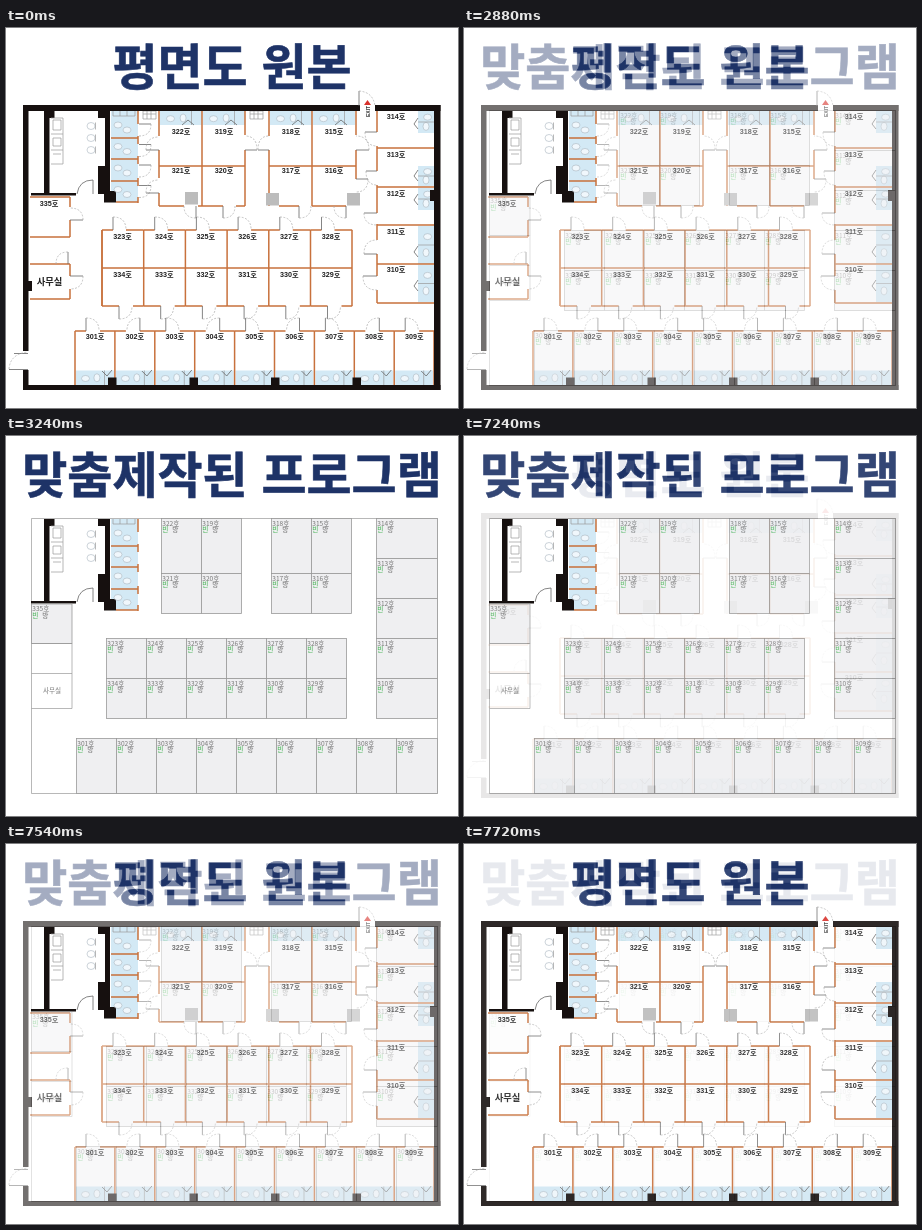
Recreate the animation shown at these times as an HTML page. Size 452x380 px, loop 7.78 s.

```html
<!DOCTYPE html>
<html lang="ko">
<head>
<meta charset="utf-8">
<style>
  html, body { margin: 0; width: 100%; height: 100%; overflow: hidden; background: #fff; }
  svg { display: block; width: 452px; height: 380px; }
  text { font-family: "Noto Sans CJK KR", "Noto Sans CJK", sans-serif; }
  .title { font-size: 49px; font-weight: 700; fill: #1e3367; stroke: #1e3367; stroke-width: .6; text-anchor: middle; }
  .name { font-family: "Liberation Sans", "Noto Sans CJK KR", sans-serif; font-size: 7.2px; font-weight: 700; fill: #222; text-anchor: middle; }
  .tag { font-size: 6.6px; fill: #777; }
  .wall { fill: none; stroke: #c8713c; stroke-width: 1.5; }
  .thin { fill: none; stroke: #9a9a9a; stroke-width: .7; }
  .leaf { fill: none; stroke: #666; stroke-width: .8; }
  .swing { fill: none; stroke: #aaa; stroke-width: .7; stroke-dasharray: 2 1.5; }
  .fixture { fill: #fff; fill-opacity: .65; stroke: #a9b6bf; stroke-width: .6; }
  .cell { fill: #efeff1; stroke: #9a9a9a; stroke-width: .8; }
</style>
</head>
<body>
<svg viewBox="0 0 452 380">
  <rect width="452" height="380" fill="#fff"/>
  <g id="drawing"></g>
  <g id="program"></g>
</svg>
<script>
const range = (n, f) => Array.from({ length: n }, (_, i) => f(i)).join('');
const rect = (x, y, w, h, fill) => `<rect x="${x}" y="${y}" width="${w}" height="${h}" fill="${fill}"/>`;
const path = (cls, d) => `<path class="${cls}" d="${d}"/>`;
const text = (cls, x, y, s) => `<text class="${cls}" x="${x}" y="${y}">${s}</text>`;
const black = (x, y, w, h) => rect(x, y, w, h, '#16100f');
const oval = (x, y, rx, ry) => `<ellipse class="fixture" cx="${x}" cy="${y}" rx="${rx}" ry="${ry}"/>`;
const name = (x, y, n) => text('name', x, y, n + '호');

// Doors: a straight leaf from the hinge, then the swing back to the wall.
const door = (x, y, w, h) => path('leaf', `M${x} ${y}v${h}`) + path('swing', `M${x} ${y + h}q${w} 0 ${w} ${-h}`);
const sideDoor = (x, y, w, h) => path('leaf', `M${x} ${y}h${w}`) + path('swing', `M${x + w} ${y}q0 ${h} ${-w} ${h}`);

function bath(x, y, w, h) {
  const wide = w > h;
  return rect(x, y, w, h, '#d3e9f5') +
    (wide
      ? oval(x + w * .25, y + h * .55, 4, 3) + oval(x + w * .55, y + h * .5, 3, 4)
      : oval(x + w * .6, y + h * .28, 4, 3) + oval(x + w * .5, y + h * .7, 3, 4)) +
    path('thin', wide ? `M${x + w * .75} ${y}v${h}` : `M${x} ${y + h * .5}h${w}`);
}

// Kitchen and wash cubicles, shared by both plans.
function services() {
  return black(38, 83, 5.5, 83) + black(43, 83, 5.5, 7) + black(25, 165, 45, 2.5) +
    black(99, 83, 5, 82) + black(92, 83, 8, 7) + black(92, 138, 12, 28) +
    path('thin', 'M45 90h12v46h-12M47 92h8v10h-8zM45 106h12M47 110h8v8h-8zM45 122h12M47 126h8') +
    range(3, i => oval(85, 98 + i * 12, 4, 3.5) + path('thin', `M89.5 ${94.5 + i * 12}v7`)) +
    path('leaf', 'M87 166v-14q-14 0 -16 14') +
    rect(105, 83, 27, 91, '#d3e9f5') + black(98, 163, 12, 11.5) +
    range(4, i => oval(112, 97 + i * 21.5, 4, 3) + oval(121, 102 + i * 21.5, 4, 3)) +
    path('thin', 'M107 83v5h22v-5M114 83v5M121 83v5') +
    path('wall', 'M105 110h27M105 131h27M105 153h27M110 174h22M132 83v13M132 108v8M132 128v8M132 150v8M132 169v6');
}

const middleNames = [i => 323 + i, i => 334 - i];
const blockNames = [[322, 319, 318, 315], [321, 320, 317, 316]];

function drawingPlan() {
  const outer = black(17, 77, 337, 6) + black(369, 77, 65.5, 6) + black(17, 77, 5.5, 246) +
    black(17, 342, 5.5, 20) + black(428, 77, 6.5, 285) + black(17, 357, 417.5, 5) +
    black(22, 253, 4, 10) + black(424, 162, 5, 11) +
    range(4, i => black(102 + i * 81.5, 349.5, 8.5, 8));

  const upper = [153, 196, 263, 306].map((x, i) =>
    bath(x + 1, 83, 42, 14) +
    path('leaf', `M${x + 23} 97l6 -5 6 5`) +
    name(x + 22, 105.7, blockNames[0][i]) + name(x + 22, 144.7, blockNames[1][i])).join('') +
    path('wall', 'M153 83v25M153 122v28M153 165v13M196 83v95M239 83v24M239 122v56' +
      'M153 138h86M153 178h25M192 178h25M230 178h9' +
      'M263 83v25M263 122v56M306 83v95M350 83v24M350 122v29M263 138h87M273 178h20M306 178h34') +
    [[179, 164], [260, 165], [341, 165]].map(([x, y]) => rect(x, y, 13, 12.5, '#bcbcbc')).join('') +
    [137, 244].map(x => path('thin', `M${x} 83h13v8h-13zM${x} 86h13M${x + 4} 83v8M${x + 8} 83v8`)).join('') +
    range(4, i => sideDoor(133, 96 + i * 20.5, 12, 12)) +
    sideDoor(153, 122, -13, -13) + sideDoor(153, 165, -13, -13) + sideDoor(239, 122, 12, -14) +
    sideDoor(263, 122, -11, -14) + sideDoor(350, 122, 13, -14) + sideDoor(350, 151, 12, 13) +
    door(217, 178, 12, 12) + door(293, 178, 12, 12) + door(190, 178, -12, 12) + door(340, 178, -12, 12);

  const right = range(5, i => name(390, 90.7 + i * 38.4, 314 - i)) +
    bath(412, 83, 16, 22) + bath(412, 138, 16, 20) + bath(412, 160, 16, 22) +
    bath(412, 198, 16, 38) + bath(412, 237, 16, 37) +
    path('wall', 'M371 83v21M371 118v25M371 157v28M371 196v16M371 226v22M371 262v13' +
      'M371 120h57M371 159h57M371 197h57M371 236h57M371 275h57') +
    sideDoor(371, 104, -12, 14) + sideDoor(371, 143, -11, 14) + sideDoor(371, 185, -13, 12) +
    sideDoor(371, 226, -13, -14) + sideDoor(371, 248, -14, 14) +
    [96, 148, 172, 224, 258].map(y => path('leaf', `M412 ${y - 6}l-4 6 4 5`)).join('');

  const middle = path('wall', 'M96 202v76M96 240h250M346 202v76') +
    range(6, i => {
      const x = 96 + i * 41.7;
      return path('wall', `M${x} 202v76M${x} 202h11M${x + 24} 202h17.7M${x} 278h17M${x + 31} 278h10.7`) +
        door(x + 11, 202, 13, -13) + door(x + 17, 278, 13, 13) +
        name(x + 20.5, 210.5, middleNames[0](i)) + name(x + 20.5, 248.5, middleNames[1](i));
    });

  const lower = range(9, i => {
    const x = 69 + i * 39.9;
    return bath(x + 1, 342.5, 38, 14.5) +
      path('leaf', `M${x + 27} 343l5 5 5 -6`) +
      path('wall', `M${x} 303v54M${x} 303h11M${x + 25} 303h15`) +
      door(x + (i % 2 ? 25 : 11), 303, i % 2 ? -13 : 13, -13) + name(x + 20, 311.2, 301 + i);
  }) + path('wall', 'M428 303v54');

  const left = path('wall', 'M24 169h40M24 209h40M24 236h40M24 271h40M64 169v10M64 192v17M64 236v12M64 261v10') +
    sideDoor(64, 192, 13, -12) + sideDoor(64, 248, 13, 13) + door(62, 236, -12, -12) +
    name(43, 177.7, 335) + '<text class="name" x="43.5" y="257" style="font-size:9.3px">사무실</text>';

  const entrances = path('leaf', 'M3 341.5h19M8 325.5h14M353 78v-15') +
    path('swing', 'M3 341q1 -15 19 -17M353 63q14 1 16 15') +
    '<path d="M358 77l3.5 -5 3.5 5z" fill="#d8322c"/>' +
    '<text transform="translate(364 89) rotate(-90)" style="font:700 5px \'Liberation Sans\',sans-serif" fill="#333">EXIT</text>';

  return text('title', 226, 57, '평면도 원본') + services() + upper + right + middle + lower + left + outer + entrances;
}

function cell(x, y, w, h, number) {
  return `<rect class="cell" x="${x}" y="${y}" width="${w}" height="${h}"/>` +
    text('tag', x + .8, y + 7, number + '호') +
    `<text class="tag" x="${x + .8}" y="${y + 13.8}"><tspan fill="#35ad45">빈</tspan> <tspan dx="2" fill="#666">방</tspan></text>`;
}

function programPlan() {
  const upper = [155.5, 195.5, 265.5, 305.5].map((x, i) =>
    cell(x, 82.5, 40, 55, blockNames[0][i]) + cell(x, 137.5, 40, 40, blockNames[1][i])).join('');
  return '<rect width="452" height="380" fill="#fff"/>' +
    text('title', 226, 57, '맞춤제작된 프로그램') +
    path('thin', 'M25.5 82.5h406v275h-406z') + services() + upper +
    range(5, i => cell(370.5, 82.5 + i * 40, 61, 40, 314 - i)) +
    range(6, i => cell(100.5 + i * 40, 202.5, 40, 40, middleNames[0](i)) +
      cell(100.5 + i * 40, 242.5, 40, 40, middleNames[1](i))) +
    range(9, i => cell(70.5 + i * 40, 302.5, i < 8 ? 40 : 41, 55, 301 + i)) +
    cell(25.5, 168, 40.5, 39.5, 335) +
    path('thin', 'M25.5 207.5h40.5v65h-40.5M25.5 237.5h40.5') +
    '<text class="tag" x="46" y="257" text-anchor="middle">사무실</text>';
}

const program = document.getElementById('program');
document.getElementById('drawing').innerHTML = drawingPlan();
program.innerHTML = programPlan();

const LOOP = 7780, STEP = 60;
const fade = (t, start) => Math.max(0, Math.min(1, (Math.floor((t - start) / STEP) + 1) / 10));

function frame() {
  const t = performance.now() % LOOP;
  program.setAttribute('opacity', fade(t, 2700) - fade(t, 7240));
  requestAnimationFrame(frame);
}
frame();
</script>
</body>
</html>
```
